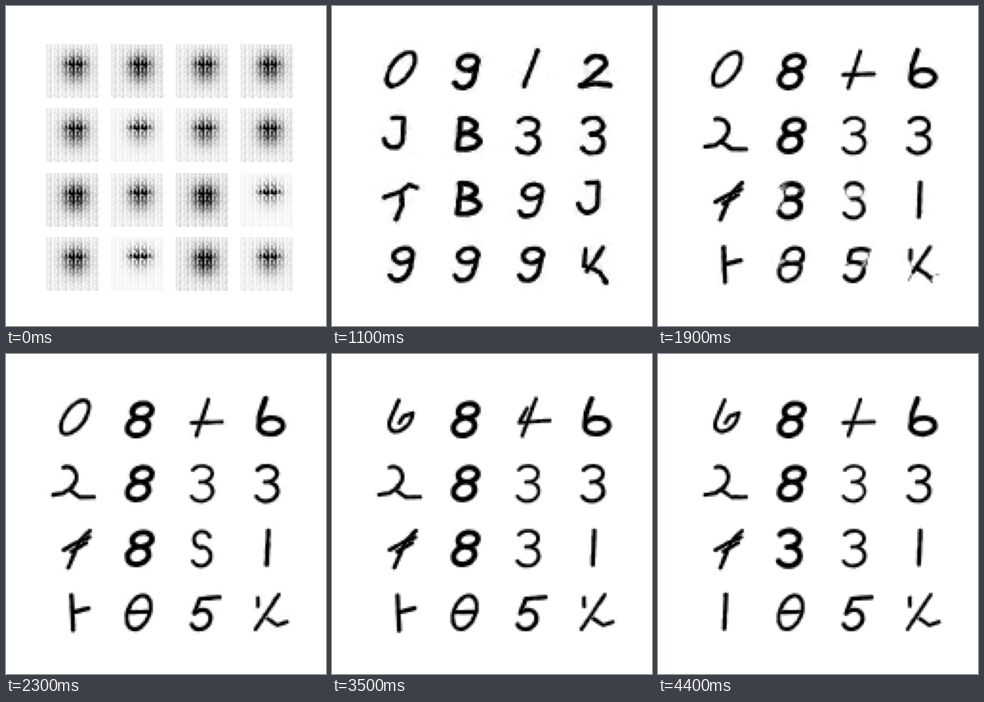
A matplotlib script for the animation above (4500 ms loop, 400 by 400 pixels).

```python
import numpy as np
import matplotlib.pyplot as plt
from matplotlib.animation import FuncAnimation

FRAMES, INTERVAL = 45, 100
N, SIDE = 28, 67          # grid cells per tile, tile side in pixels
SOFT, GAP = 2.4, 4.8      # edge softness, growth range of new strokes
KEYS = (4, 11, 15, 23, 35, 44)

rows, cols = np.mgrid[:N, :N]
px, py = (cols + 0.5) * SIDE / N, (rows + 0.5) * SIDE / N


def arc(cx, cy, rx, ry, start=0, end=360):
    a = np.radians(np.linspace(start, end, 50))
    return np.column_stack([cx + rx * np.cos(a), cy + ry * np.sin(a)])


def line(*flat):
    p = np.array(flat, float).reshape(-1, 2)
    t = np.linspace(0, len(p) - 1, 16 * len(p))
    k = np.arange(len(p))
    return np.column_stack([np.interp(t, k, p[:, 0]), np.interp(t, k, p[:, 1])])


def glyph(slant, *parts):
    """Distance from every grid cell to the slanted strokes."""
    p = np.vstack(parts)
    x = p[:, 0] + slant * (SIDE / 2 - p[:, 1])
    return np.hypot(px[..., None] - x, py[..., None] - p[:, 1]).min(axis=-1)


GLYPHS = {
    "0": glyph(0.25, arc(35, 34, 14, 21), line(23, 34, 47, 33)),
    "1": glyph(0, line(35, 12, 33, 54)),
    "2": glyph(0, arc(26, 26, 12, 13, -110, 60), line(33, 38, 22, 46, 9, 48),
               line(31, 43, 42, 51, 60, 51)),
    "3": glyph(0.05, arc(32, 22, 13, 10, 210, 440), arc(33, 44, 14, 12, -100, 150)),
    "4": glyph(0, line(43, 8, 26, 54), line(32, 20, 22, 38, 60, 35)),
    "5": glyph(0.15, line(52, 15, 28, 17, 24, 33), arc(33, 43, 12, 12, -140, 150)),
    "6": glyph(0.1, line(29, 8, 24, 26, 24, 42), arc(39, 42, 15, 10)),
    "8": glyph(0.2, arc(37, 23, 12, 9), arc(36, 43, 13, 11)),
    "9": glyph(0.2, arc(37, 23, 12, 9), line(49, 22, 48, 42), arc(36, 42, 12, 12, 0, 150)),
    "B": glyph(0, line(30, 14, 26, 50), arc(32, 22, 17, 9, -100, 90),
               arc(33, 41, 20, 10, -90, 110)),
    "I": glyph(0.35, line(28, 15, 43, 15), line(41, 16, 41, 52), line(26, 53, 52, 53)),
    "J": glyph(0, line(26, 12, 40, 12, 39, 34), arc(27, 36, 12, 13, 0, 170)),
    "K": glyph(0, line(24, 16, 22, 36), line(46, 13, 26, 42), line(24, 36, 42, 44, 50, 57)),
    "O": glyph(0.5, arc(35, 31, 14, 21)),
    "S": glyph(0, arc(33, 23, 10, 10, -20, -270), arc(32, 44, 12, 12, -90, 150)),
    "T": glyph(0, line(16, 30, 36, 23, 46, 15, 56, 18), line(37, 24, 38, 40, 30, 58)),
    "Z": glyph(0.1, arc(36, 24, 12, 9, 190, 380), line(47, 27, 21, 52),
               line(19, 52, 38, 49, 56, 51)),
    "c": glyph(0.4, line(24, 10, 23, 34), arc(36, 34, 13, 15, 180, -30),
               line(48, 26, 38, 30, 36, 38)),
    "f": glyph(0, line(55, 12, 42, 25, 28, 58), line(22, 36, 38, 27, 54, 20),
               line(32, 38, 50, 27)),
    "t": glyph(0, line(32, 13, 34, 56), line(34, 34, 53, 29)),
    "x": glyph(0, line(48, 12, 19, 55), line(22, 16, 22, 26), line(34, 42, 46, 50, 58, 46)),
    "+": glyph(0, line(41, 9, 26, 54), line(20, 38, 58, 37)),
    "/": glyph(0, line(45, 8, 28, 52)),
}

# what each tile reads at the key times, final half width, first grey
TILES = [
    ("IOOOcc", 2.4, .5), ("998888", 3.5, .55), ("9/++4+", 2.2, .5), ("ZZ6666", 3.3, .55),
    ("2J2222", 2.4, .5), ("ZB8888", 3.5, .2), ("833333", 2.0, .4), ("533333", 2.4, .5),
    ("9Tffff", 2.5, .65), ("8B3883", 3.5, .4), ("S93S33", 2.2, .7), ("3J1111", 2.7, .1),
    ("99ttt1", 2.7, .5), ("J98000", 2.5, .1), ("399555", 2.7, .65), ("KKKxxx", 2.3, .35),
]

weave = np.tile(np.random.default_rng(4).random((4, 4)), (7, 7))
weave = 0.8 * weave + 0.2 * ((rows + cols) % 2)


def start(grey):
    """Woven blob; the paler it is, the darker its dotted band."""
    x, band = cols - 14.8, 1.05 - grey
    blob = np.exp(-(x / 6.2)**2 - ((rows - 12.5) / 6.8)**2) * (0.3 + 1.2 * weave)
    bar = np.exp(-(x / 6)**4 - ((rows - 9.3) / 0.9)**2) * (0.4 + weave)
    dots = np.exp(-(x / 6)**2 - ((rows - 9) / 5)**2) * (weave > 0.62)
    return grey * blob + band * (0.8 * bar + 0.6 * dots) + (0.04 + 0.25 * grey) * weave**2


def grain(f, k):
    n = np.random.default_rng(100 * f + k).normal(size=(N, N))
    for axis in (0, 1):
        n = (np.roll(n, 1, axis) + 2 * n + np.roll(n, -1, axis)) / 4
    return n


def pose(k, i):
    """Signed distance field; strokes start out equally heavy."""
    text, half, _ = TILES[k]
    return GLYPHS[text[i]] - half - (3.4 - half) * np.exp(-i / 1.5)


def ink(f, k):
    t = max(f, KEYS[0])
    i = min(np.searchsorted(KEYS, t, side="right") - 1, len(KEYS) - 2)
    u = (t - KEYS[i]) / (KEYS[i + 1] - KEYS[i])
    a, b = pose(k, i), pose(k, i + 1)
    field = np.minimum((1 - u) * a + u * b, np.minimum(a + GAP * u, b + GAP * (1 - u)))

    age = t - KEYS[0]
    noise = grain(f, k)
    streaks = np.sin((px + py) * 2 * np.pi / 17 + 2.4 * k)
    field = field + (0.4 + 1.6 * np.exp(-age / 7)) * noise + 1.8 * np.exp(-age / 3) * streaks
    haze = 0.3 * np.exp(-age / 12) * np.clip(noise, 0, 1) * np.exp(-np.clip(field, 0, None) / 5)
    shape = np.clip(0.5 - field / SOFT, 0, 1) + haze

    mix = min(f / KEYS[0], 1)
    if mix < 1:
        shape = (1 - mix) * start(TILES[k][2]) + mix * shape
    return np.clip(shape, 0, 1)


fig, axes = plt.subplots(4, 4, figsize=(4, 4), dpi=100)
images = []
for ax in axes.flat:
    ax.axis("off")
    images.append(ax.imshow(np.zeros((N, N)), cmap="gray_r", vmin=0, vmax=1))


def update(f):
    for k, im in enumerate(images):
        im.set_data(ink(f, k))
    return images


anim = FuncAnimation(fig, update, frames=FRAMES, interval=INTERVAL, repeat=True, repeat_delay=0)
plt.show()
```
